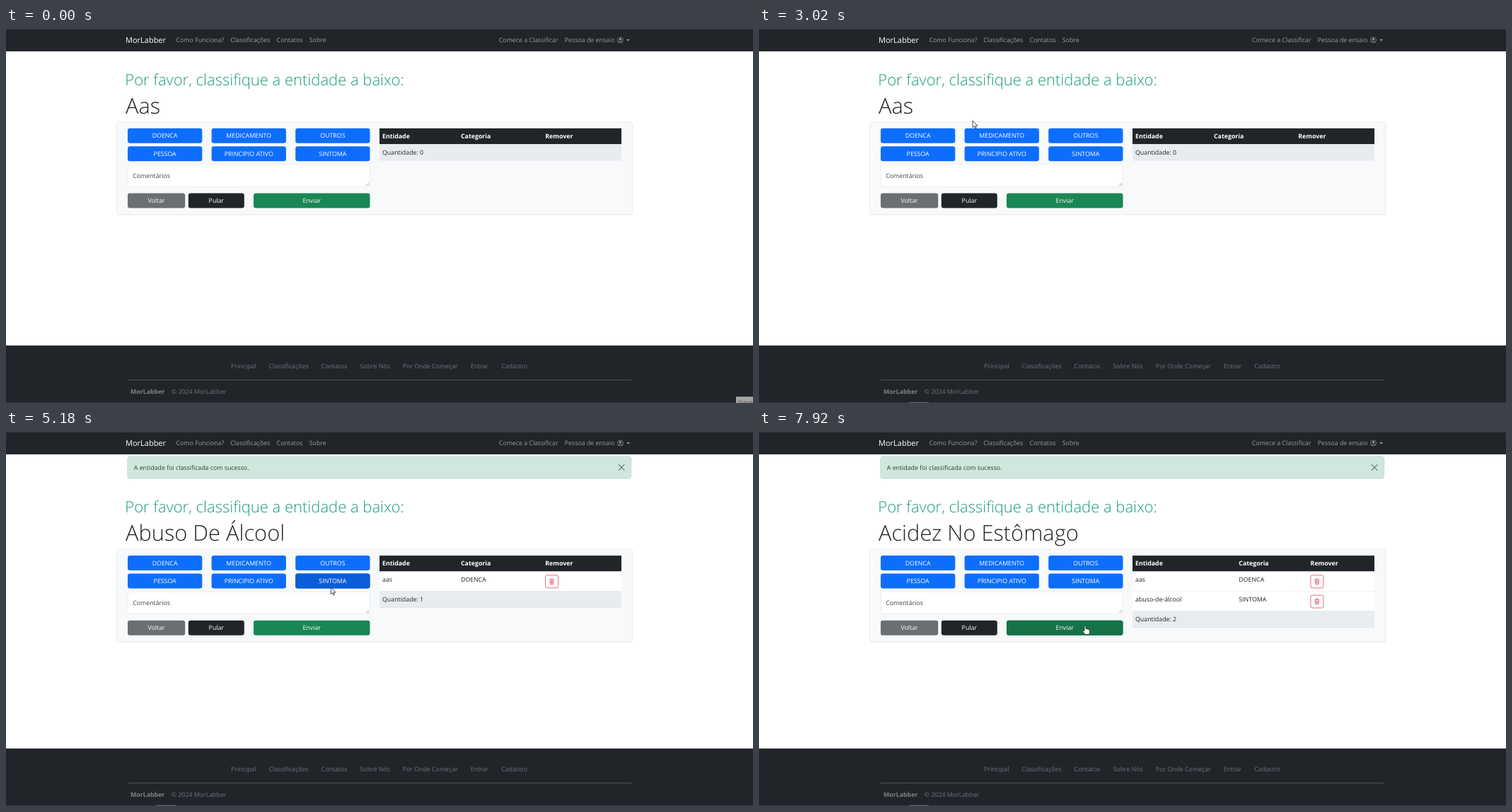
These frames come from a looping animation (1056 px wide and 530 px high, 7990 ms). An HTML page:

```html
<!DOCTYPE html>
<html lang="pt">
<head>
<meta charset="utf-8">
<title>Classificador</title>
<style>
  html, body { margin: 0; width: 100%; height: 100%; overflow: hidden; background: #fff; }
  svg { display: block; width: 1056px; height: 530px; }
  text { font-family: "Open Sans", "Noto Sans", sans-serif; font-size: 8.8px; text-rendering: geometricPrecision; white-space: pre; }
</style>
</head>
<body>
<svg id="stage" viewBox="0 0 1056 530"></svg>
<script>
const LOOP = 7990, SHIFT = 34.3, DARK = '#212529', LINE = '#dee2e6', RED = '#dc3545';
const BRAND = 'MorLabber';

const rect = (x, y, w, h, fill, extra = '') =>
  `<rect x="${x}" y="${y}" width="${w}" height="${h}" fill="${fill}" ${extra}/>`;
const text = (x, y, s, fill = DARK, extra = '') =>
  `<text x="${x}" y="${y}" fill="${fill}" ${extra}>${s}</text>`;
const size = (px, weight = 400) => `style="font-size:${px}px;font-weight:${weight}"`;
const ROUND = 'rx="3.3"';
const BOLD = 'font-weight="700"';

// Buttons with a hover layer that fades in
const hotspots = [];
function button(x, y, w, label, fill, hover) {
  const h = 21;
  let over = '';
  if (hover) {
    const id = 'hot' + hotspots.length;
    hotspots.push({ id, x, y, w, h });
    over = rect(x, y, w, h, hover, `${ROUND} id="${id}" opacity="0"`);
  }
  return rect(x, y, w, h, fill, ROUND) + over +
    text(x + w / 2, y + 13.6, label, '#fff', 'text-anchor="middle"');
}

const trashIcon = (x, y, color) =>
  `<path transform="translate(${x} ${y})" fill="none" stroke="${color}" stroke-width=".65"
    d="M.6 1.6H7.4M2.8 1.6V.5H5.2V1.6M1.3 1.8L1.7 8.2H6.3L6.7 1.8M2.8 3V7M4 3V7M5.2 3V7"/>`;

function trash(x, y, hot) {
  let s = rect(x + .3, y + .3, 18, 18, '#fff', `rx="2.2" stroke="${RED}" stroke-width=".7"`) +
    trashIcon(x + 5.2, y + 5, RED);
  if (hot) {
    const id = 'hot' + hotspots.length;
    hotspots.push({ id, x, y, w: 18.6, h: 18.6 });
    s += `<g id="${id}" opacity="0">${rect(x, y, 18.6, 18.6, RED, 'rx="2.5"')}${trashIcon(x + 5.2, y + 5, '#fff')}</g>`;
  }
  return s;
}

function table(title, rows, categoryX, removeX) {
  const rowH = 28.2, top = 164.2, foot = top + rows.length * rowH;
  let s = text(169, 121, title, DARK, size(30.8, 300));
  s += rect(528, 141.8, 342, 22.4, DARK);
  [['Entidade', 532], ['Categoria', categoryX], ['Remover', removeX]]
    .forEach(([label, x]) => { s += text(x, 156, label, '#fff', BOLD); });
  rows.forEach(([name, category], i) => {
    const y = top + i * rowH;
    s += rect(528, y, 342, rowH, '#fff') + rect(528, y + rowH - .6, 342, .6, LINE) +
      text(532, y + 14.6, name) + text(categoryX, y + 14.6, category) +
      trash(removeX, y + 5, rows.length === 2 && i === 0);
  });
  return s + rect(528, foot, 342, 22.9, '#e9ecef') + rect(528, foot + 22.5, 342, .6, LINE) +
    text(532, foot + 14.4, 'Quantidade: ' + rows.length);
}

function navbar() {
  const gray = '#9b9d9f';
  let s = rect(0, 0, 1056, 33, DARK) + rect(0, .5, 1056, 1, '#53575b') +
    text(169, 20.8, BRAND, '#fff', size(11));
  [['Como Funciona?', 240.5], ['Classificações', 317.3], ['Contatos', 382.6], ['Sobre', 428.8],
    ['Comece a Classificar', 696.8], ['Pessoa de ensaio', 789.8]]
    .forEach(([label, x]) => { s += text(x, 20.2, label, gray); });
  return s + `<g fill="none" stroke="${gray}" stroke-width=".7"><circle cx="868.5" cy="17" r="4"/>
    <path d="M865.7 19.8Q868.5 17.4 871.3 19.8"/></g><circle cx="868.5" cy="15.9" r="1.6" fill="${gray}"/>
    <path d="M877.2 16H882L879.6 18.5Z" fill="${gray}"/>`;
}

function footer() {
  const gray = '#6c757d';
  let s = rect(0, 448.7, 1056, 81.3, DARK) + rect(171.5, 497.2, 712.5, .7, '#64686b');
  [['Principal', 318], ['Classificações', 371.4], ['Contatos', 445.6], ['Sobre Nós', 500.5],
    ['Por Onde Começar', 560.7], ['Entrar', 656.8], ['Cadastro', 700.3]]
    .forEach(([label, x]) => { s += text(x, 480.7, label, gray); });
  return s + text(176, 516.6, BRAND, '#7d8287', BOLD) + text(233.8, 516.6, '© 2024 ' + BRAND, gray) +
    rect(0, 529.2, 1056, .8, '#3a3e42') + rect(0, 528.8, 27.5, 1.2, '#666a6d', 'id="task"');
}

function form() {
  const blue = '#0d6efd', blueOver = '#0b5ed7';
  let s = '';
  ['DOENCA', 'MEDICAMENTO', 'OUTROS', 'PESSOA', 'PRINCIPIO ATIVO', 'SINTOMA'].forEach((label, i) => {
    s += button(172 + i % 3 * 118.6, i < 3 ? 141.8 : 167.2, 105.3, label, blue, blueOver);
  });
  return s + rect(172.2, 193, 342, 31.4, '#fff', `${ROUND} stroke="${LINE}" stroke-width=".6"`) +
    text(179.2, 211.7, 'Comentários', '#3f4347') +
    '<path d="M509 222.8L513 218.8M511.2 222.8L513 221" stroke="#777" stroke-width=".6"/>' +
    button(172, 233.5, 81.2, 'Voltar', '#6b6f72') +
    button(257.8, 233.5, 79, 'Pular', DARK) +
    button(350, 233.5, 164.5, 'Enviar', '#198754', '#157347');
}

const alertBox = rect(171.8, 36.2, 711.8, 30.8, '#d1e7dd', `${ROUND} stroke="#a3cfbb" stroke-width=".6"`) +
  text(180.8, 54.6, 'A entidade foi classificada com sucesso.', '#1f4232') +
  '<path d="M866.2 47.6L874 55.4M874 47.6L866.2 55.4" stroke="#5f6f67" stroke-width="1.1" stroke-linecap="round"/>';

const pages = [
  table('Aas', [], 643, 762.3),
  table('Abuso De Álcool', [['aas', 'DOENCA']], 643, 762.3),
  table('Acidez No Estômago', [['aas', 'DOENCA'], ['abuso-de-álcool', 'SINTOMA']], 678.3, 779.6)
];

const cursors = `
  <path id="arrow" d="M0 0V9.6L2.2 7.6L3.7 11L5.2 10.3L3.8 7.1H6.8Z" fill="#fff" stroke="#222" stroke-width=".8"/>
  <path id="hand" d="M-1 1Q0-.6 1 1V4.6Q2.4 4 3 5.1Q4.4 4.6 5 5.7Q6.6 5.4 6.6 7V9.4Q6.4 11 5.4 12.6H-.2
    Q-1.2 10.6-3 8.6Q-4 7-2.6 6.8L-1 8Z" fill="#fff" stroke="#222" stroke-width=".8" stroke-linejoin="round"/>`;

const stage = document.getElementById('stage');
stage.innerHTML = rect(0, 0, 1056, 530, '#fff') + navbar() + `<g id="alert">${alertBox}</g><g id="main">` +
  text(168.3, 81.2, 'Por favor, classifique a entidade a baixo:', '#1b9b7e', size(22, 300)) +
  rect(156.5, 133.6, 729.6, 131, '#000', `${ROUND} opacity=".05"`) +
  rect(156.2, 132.7, 729.6, 131, '#f8f9fa', `${ROUND} stroke="${LINE}" stroke-width=".6"`) +
  form() + pages.map((p, i) => `<g id="page${i}">${p}</g>`).join('') + '</g>' + footer() +
  `<g id="tip">${rect(1032, 521, 24, 9, '#a3a3a3')}${text(1035, 531, 'Gravar', '#444', size(6.6))}</g>` +
  `<g id="cursor">${cursors}</g>`;

const el = id => document.getElementById(id);
const show = (id, on) => el(id).setAttribute('visibility', on ? 'inherit' : 'hidden');

// Pointer moves: start ms, end ms, destination x, y
const moves = [
  [10, 470, 400, 131], [670, 1470, 229, 155], [1610, 1880, 229.5, 149], [1950, 2150, 231, 143],
  [2290, 3020, 302, 131], [3430, 3540, 370, 128], [3540, 3620, 425, 152], [3620, 3690, 392, 174],
  [3770, 3900, 395, 187], [3900, 4230, 442, 217.5], [4300, 4580, 439, 211.5], [5060, 5460, 531, 255],
  [5460, 5730, 524, 280], [5800, 6500, 793, 204], [6500, 6630, 795, 207.5], [6710, 6840, 797, 198],
  [6840, 7280, 570, 282], [7280, 7400, 519, 266], [7400, 7530, 424, 266], [7600, 7920, 461, 275]
];

function pointerAt(t) {
  let x = 1045, y = 537;
  for (const [start, end, toX, toY] of moves) {
    if (t <= start) break;
    const u = Math.min(1, (t - start) / (end - start)), e = u * u * (3 - 2 * u);
    x += (toX - x) * e;
    y += (toY - y) * e;
  }
  return { x, y };
}

const pageAt = t => t < 3085 ? 0 : t < 5190 ? 1 : 2;

function isOver(spot, t) {
  const p = pointerAt(t), y = p.y - (pageAt(t) ? SHIFT : 0);
  return p.x >= spot.x && p.x <= spot.x + spot.w && y >= spot.y && y <= spot.y + spot.h;
}

function draw(t) {
  const page = pageAt(t), p = pointerAt(t);
  pages.forEach((_, i) => show('page' + i, i === page));
  show('alert', page > 0);
  el('main').setAttribute('transform', `translate(0 ${page ? SHIFT : 0})`);

  let hand = false;
  for (const spot of hotspots) {
    const trail = [0, 50, 100].filter(lag => isOver(spot, t - lag)).length;
    el(spot.id).setAttribute('opacity', trail / 3);
    hand = hand || isOver(spot, t);
  }
  if (t >= 4915 && t < 5190) hand = false;

  show('cursor', t >= 65);
  el('cursor').setAttribute('transform', `translate(${p.x} ${p.y})`);
  show('hand', hand);
  show('arrow', !hand);

  show('tip', t < 135);
  show('task', t >= 135);
  el('task').setAttribute('x', t < 2080 ? 268 : 212.5);
}

const began = performance.now();
function tick() {
  draw((performance.now() - began) % LOOP);
  requestAnimationFrame(tick);
}
tick();
</script>
</body>
</html>
```
